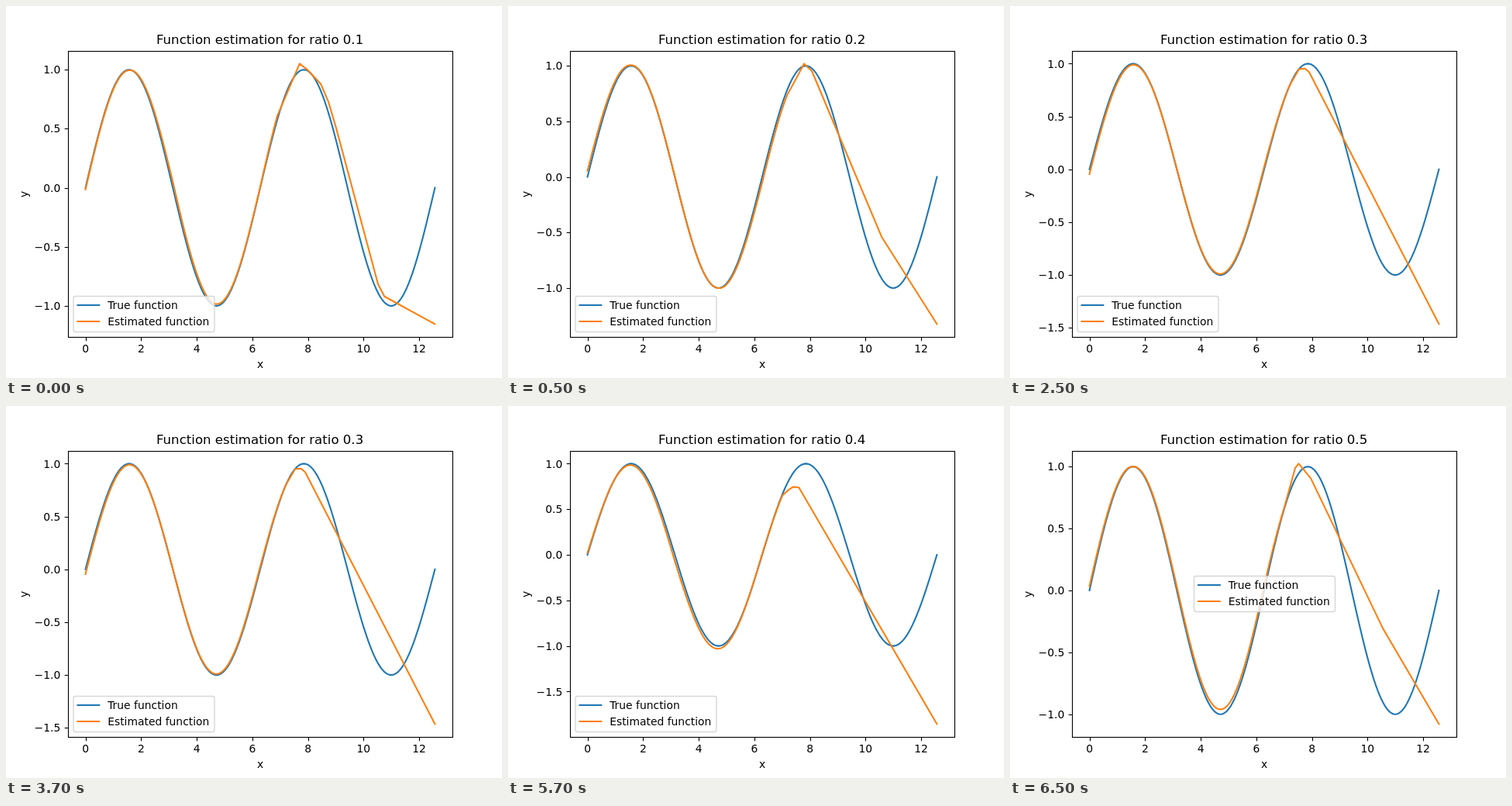
An HTML page that plays this animation: 640 px wide and 480 px high, repeating every 8000 ms.

```html
<!DOCTYPE html>
<html lang="en">
<head>
<meta charset="utf-8">
<title>Function estimation</title>
<style>
  html, body { margin: 0; width: 100%; height: 100%; overflow: hidden; background: #fff; }
  svg { display: block; width: 640px; height: 480px; }
  text { font: 13.89px "DejaVu Sans", sans-serif; fill: #000; }
  .title { font-size: 16.6px; }
  .mid { text-anchor: middle; }
  .end { text-anchor: end; }
  .line { fill: none; stroke-width: 2.083; stroke-linejoin: round; stroke-linecap: square; }
  .true { stroke: #1f77b4; }
  .est { stroke: #ff7f0e; }
  .axis { fill: none; stroke: #000; stroke-width: 1.11; }
  .box { fill: #fff; fill-opacity: .8; stroke: #ccc; stroke-opacity: .8; stroke-width: 1.389; }
  #strip { animation: flip 8s step-end infinite; }
  @keyframes flip {
    0% { transform: translateX(0); }
    6.25% { transform: translateX(-640px); }
    31.25% { transform: translateX(-1280px); }
    56.25% { transform: translateX(-1920px); }
    81.25%, 100% { transform: translateX(-2560px); }
  }
</style>
</head>
<body>
<svg viewBox="0 0 640 480">
  <g id="strip"></g>
  <g id="frame"></g>
</svg>
<script>
const X0 = 102.55, UNIT = 35.88, TOP = 74.4, BOTTOM = 410.4;
const QUARTER = Math.PI / 2, END = 4 * Math.PI;

// error: offset from the sine at each quarter wave; tail: corners where the fit leaves it.
const scenes = [
  { error: [-.015, -.005, .05, .015, .005],
    tail: [[6.9, .61], [7.7, 1.051], [8, .995], [8.46, .88], [8.74, .726], [9.01, .51],
           [10.52, -.815], [10.75, -.92], [END, -1.154]] },
  { error: [.055, .005, .005, 0, -.05],
    tail: [[7.18, .735], [7.79, 1.019], [8.07, .952], [10.58, -.54], [END, -1.324]] },
  { error: [-.045, -.01, .005, .01, .025],
    tail: [[7.23, .81], [7.54, .95], [7.75, .953], [7.9, .92], [END, -1.464]] },
  { error: [.02, -.015, -.07, -.03, .01],
    tail: [[7.01, .65], [7.24, .715], [7.4, .745], [7.6, .74], [END, -1.857]] },
  { error: [.035, 0, .03, .04, .04], centered: true,
    tail: [[7, .665], [7.4, .99], [7.524, 1.024], [7.96, .905], [10.55, -.306], [END, -1.079]] }
];

const text = (x, y, s, cls = "") => `<text x="${x}" y="${y}" class="${cls}">${s}</text>`;
const line = (pts, cls) => `<polyline class="line ${cls}" points="${pts.join(" ")}"/>`;
const snap = v => Math.floor(v + .5) + .5;
const toX = x => X0 + x * UNIT;

function sample(fn, end, n = 200) {
  return Array.from({ length: n + 1 }, (_, i) => [end * i / n, fn(end * i / n)]);
}

function estimate({ error, tail }) {
  const [endX, endY] = tail[0];
  const keys = error.map((e, i) => [i * QUARTER, e]);
  keys.push([endX, endY - Math.sin(endX)]);
  const fit = x => {
    const i = Math.min(Math.floor(x / QUARTER), error.length - 1);
    const [ax, a] = keys[i], [bx, b] = keys[i + 1];
    return Math.sin(x) + a + (b - a) * (x - ax) / (bx - ax);
  };
  return [...sample(fit, endX), ...tail.slice(1)];
}

function legend(centered) {
  return `<g transform="translate(${centered ? "150.5 -155" : "0 0"})">
    <rect class="box" x="87" y="374.5" width="182" height="46" rx="2.78"/>` +
    line([[92.5, 386], [120.3, 386]], "true") + text(131.2, 391, "True function") +
    line([[92.5, 407], [120.3, 407]], "est") + text(131.2, 412, "Estimated function") + "</g>";
}

function plot(scene, i) {
  const fit = estimate(scene), heights = scene.tail.map(p => p[1]);
  const high = Math.max(1, ...heights), low = Math.min(-1, ...heights);
  const toY = y => TOP + (high - y) / (high - low) * (BOTTOM - TOP);
  const place = pts => pts.map(([x, y]) => [toX(x), toY(y)]);

  let out = line(place(sample(Math.sin, END)), "true") + line(place(fit), "est");
  for (let v = 1; toY(v) < 427; v -= .5) {
    const y = toY(v);
    out += `<path class="axis" d="M80.5 ${snap(y)}h-4.86"/>` +
      text(70.3, Math.round(y + 5.1), v.toFixed(1).replace("-", "−"), "end");
  }
  out += text(327.6, 49, `Function estimation for ratio 0.${i + 1}`, "title mid");
  return `<g transform="translate(${i * 640})">${out}${legend(scene.centered)}</g>`;
}

function frame() {
  let out = '<rect class="axis" x="80.5" y="58.5" width="496" height="369"/>';
  for (let v = 0; v <= 12; v += 2) {
    out += `<path class="axis" d="M${snap(toX(v))} 427.5v4.86"/>` + text(toX(v), 447, v, "mid");
  }
  return out + text(328, 467, "x", "mid") +
    `<g transform="translate(28 243) rotate(-90)">${text(0, 0, "y", "mid")}</g>`;
}

document.getElementById("strip").innerHTML = scenes.map(plot).join("");
document.getElementById("frame").innerHTML = frame();
</script>
</body>
</html>
```
